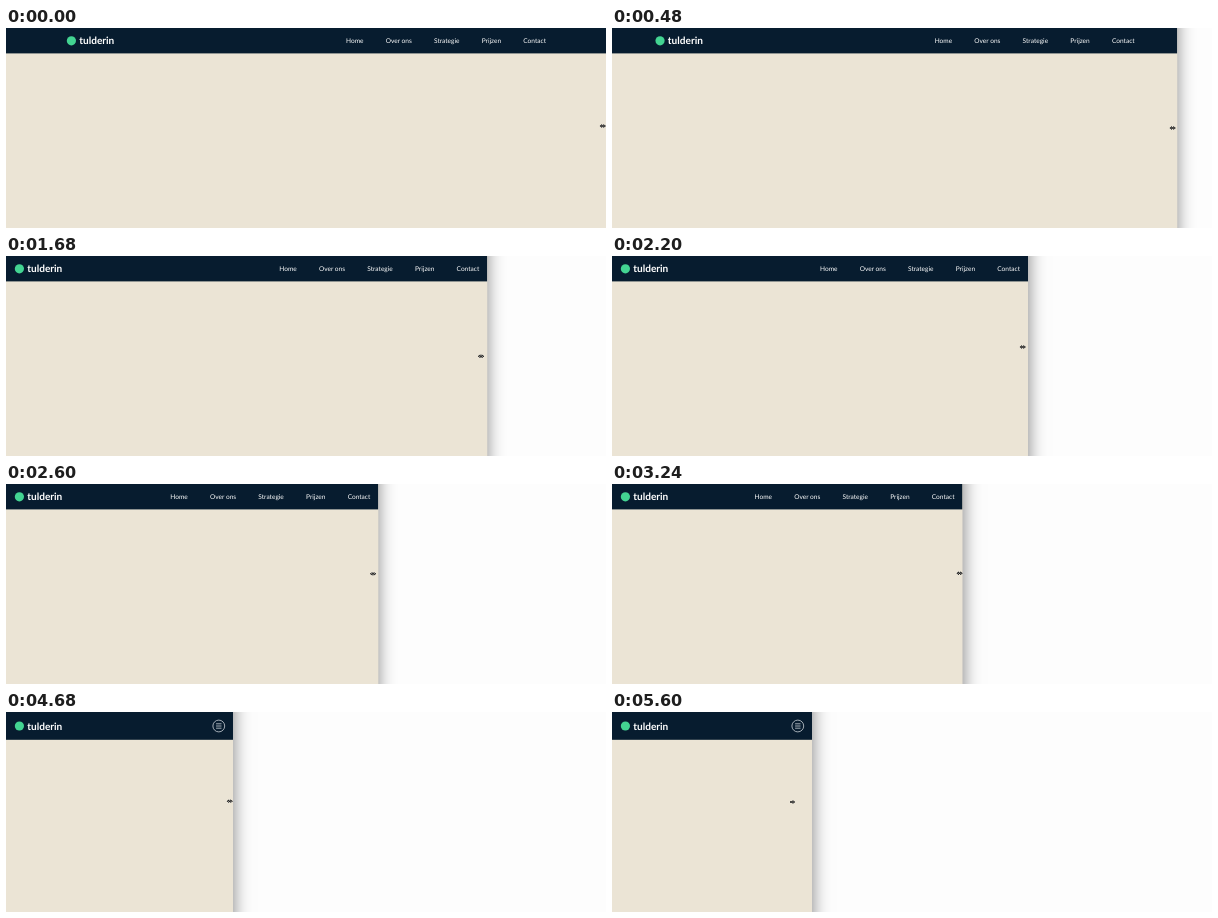
An HTML page with a canvas for the animation above (5.64 s loop, 600 by 200 pixels).

```html
<!DOCTYPE html>
<html lang="nl">
<head>
<meta charset="utf-8">
<title>Responsive header</title>
<style>
html, body { margin: 0; width: 100%; height: 100%; overflow: hidden; background: #fdfdfd; }
canvas { display: block; width: 600px; height: 200px; }
</style>
</head>
<body>
<canvas id="stage"></canvas>
<script>
const W = 600, H = 200, LOOP = 5640, STEP = 40;
const NAVY = '#071c2f', SAND = '#ebe4d5', PAGE = '#fdfdfd', GREEN = '#43d492';
const MENU = ['Home', 'Over ons', 'Strategie', 'Prijzen', 'Contact'];
const MENU_GAP = 22.2, MIN_W = 200, BREAKPOINT = 232;

const canvas = document.getElementById('stage');
const ctx = canvas.getContext('2d');
const dpr = window.devicePixelRatio || 1;
canvas.width = W * dpr;
canvas.height = H * dpr;
ctx.textRendering = 'geometricPrecision';

// Each pull of the window edge; the hand rests in between
const PULLS = [
  { from: 0, to: 1120, width: 504, y: 103.5, power: 1.2 },
  { from: 1520, to: 2140, width: 416, y: 91 },
  { from: 2200, to: 2800, width: 350.5, y: 89.3 },
  { from: 3260, to: 3840, width: 298.5, y: 87 },
  { from: 3840, to: 4400, width: 232.5, y: 89 },
  { from: 4400, to: 5080, width: MIN_W, y: 90, power: 2 }
];

const progress = (t, from, to) => Math.min(1, Math.max(0, (t - from) / (to - from)));

function edgeAt(t) {
  let w = W, y = 98;
  for (const p of PULLS) {
    const u = progress(t, p.from, p.to) ** (p.power || 1);
    w += (p.width - w) * u;
    y += (p.y - y) * u;
  }
  return { w, y };
}

function drawLogo(x, y) {
  ctx.fillStyle = GREEN;
  ctx.beginPath();
  ctx.arc(x + 5.4, y, 4.6, 0, Math.PI * 2);
  ctx.fill();
  ctx.fillStyle = '#fff';
  ctx.font = '700 10.1px Lato, sans-serif';
  ctx.fillText('tulderin', x + 13.2, y + 3.5);
}

function drawMenu(w) {
  ctx.fillStyle = '#fff';
  ctx.font = '400 6.55px Lato, sans-serif';
  const widths = MENU.map(label => ctx.measureText(label).width);
  const total = widths.reduce((a, b) => a + b) + MENU_GAP * (MENU.length - 1);
  let x = Math.max(57, Math.min(w / 2 + 240, w - 8) - total);
  MENU.forEach((label, i) => {
    ctx.fillText(label, x, 15.1);
    x += widths[i] + MENU_GAP;
  });
}

function drawBurger(x, y) {
  ctx.strokeStyle = '#c9d0d6';
  ctx.lineWidth = 0.8;
  ctx.beginPath();
  ctx.arc(x, y, 5.9, 0, Math.PI * 2);
  for (const dy of [-2.2, 0, 2.2]) {
    ctx.moveTo(x - 2.7, y + dy);
    ctx.lineTo(x + 2.7, y + dy);
  }
  ctx.stroke();
}

function drawCursor(x, y, bothWays) {
  const shape = new Path2D();
  shape.rect(x - 2, y - 0.5, 4, 1);
  for (const s of bothWays ? [-1, 1] : [1]) {
    shape.moveTo(x + s * 3, y);
    shape.lineTo(x + s * 0.7, y - s * 1.7);
    shape.lineTo(x + s * 0.7, y + s * 1.7);
    shape.closePath();
  }
  ctx.strokeStyle = 'rgba(255,255,255,.4)';
  ctx.lineWidth = 0.8;
  ctx.stroke(shape);
  ctx.fillStyle = '#111';
  ctx.fill(shape, 'evenodd');
  ctx.fill(shape);
}

function drawWindow(w) {
  const mobile = w < BREAKPOINT;

  ctx.save();
  ctx.shadowColor = 'rgba(0,0,0,.5)';
  ctx.shadowBlur = 17 * dpr;
  ctx.fillStyle = SAND;
  ctx.fillRect(0, -40, w, H + 80);
  ctx.restore();

  ctx.save();
  ctx.beginPath();
  ctx.rect(0, 0, w, H);
  ctx.clip();
  ctx.fillStyle = NAVY;
  ctx.fillRect(0, 0, w, mobile ? 27.8 : 25.4);
  drawLogo(Math.max(8, w / 2 - 240), mobile ? 14 : 12.8);
  if (mobile) drawBurger(w - 14.2, 14);
  else drawMenu(w);
  ctx.restore();
}

function draw(t) {
  const { w, y } = edgeAt(t);
  // The hand runs slightly ahead of the edge, then past its minimum
  const x = edgeAt(t + 30).w - 2 - 18 * progress(t, 5040, 5320);
  ctx.setTransform(dpr, 0, 0, dpr, 0, 0);
  ctx.fillStyle = PAGE;
  ctx.fillRect(0, 0, W, H);
  drawWindow(w);
  drawCursor(x, y, w > MIN_W);
}

const start = performance.now();
function tick() {
  const t = (performance.now() - start) % LOOP;
  draw(Math.floor(t / STEP) * STEP);
  requestAnimationFrame(tick);
}
tick();
</script>
</body>
</html>
```
